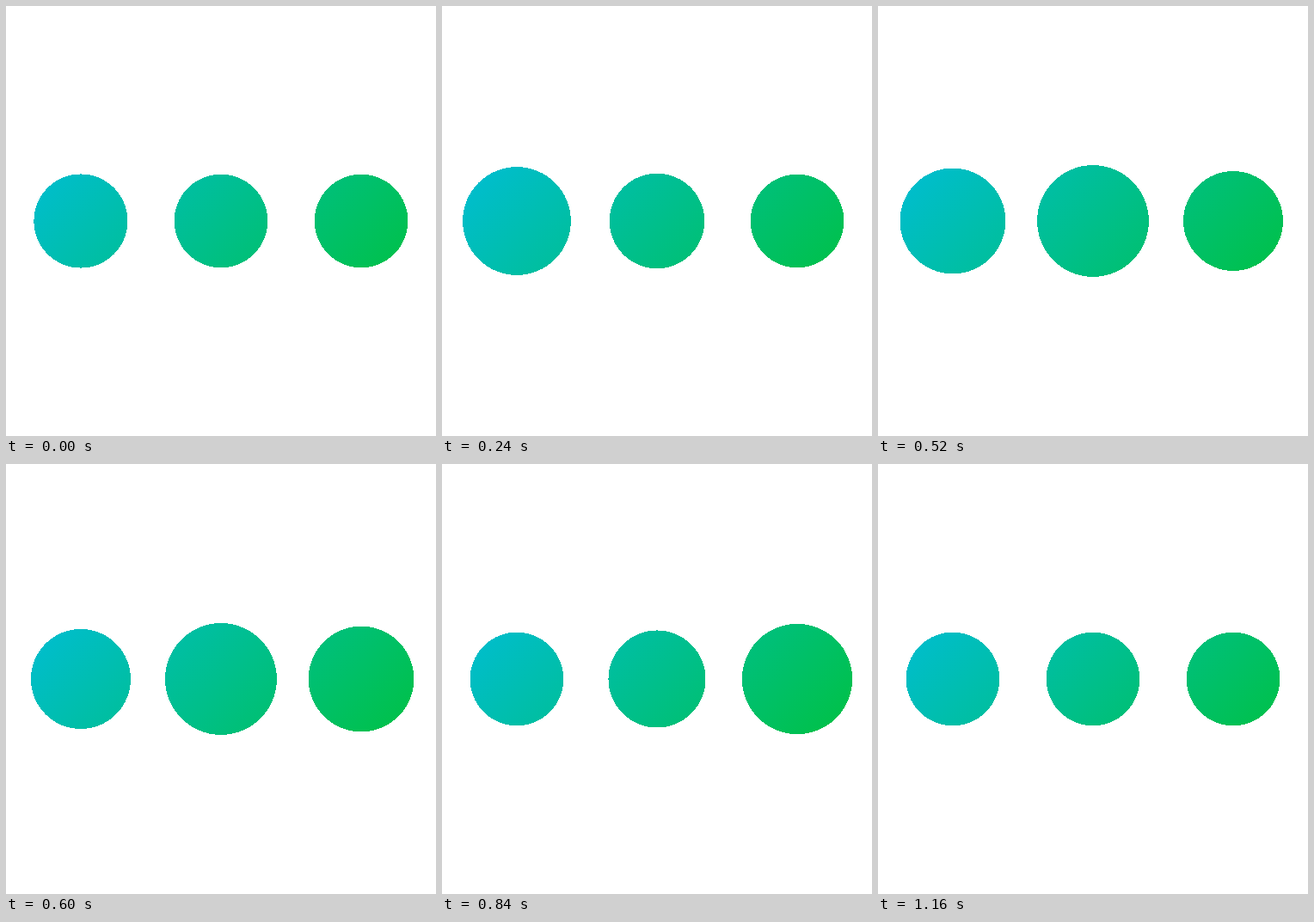
These frames come from a looping animation (500x500 px, 1.2 s). An HTML page:

```html
<!DOCTYPE html>
<html lang="en">
<head>
<meta charset="utf-8">
<title>Pulsing dots</title>
<style>
  html, body { margin: 0; width: 100%; height: 100%; overflow: hidden; background: #fff; }
  svg { display: block; width: 100%; height: 100%; }
</style>
</head>
<body>
<svg viewBox="0 0 500 500" shape-rendering="crispEdges">
  <defs>
    <linearGradient id="tint" gradientUnits="userSpaceOnUse" x1="100" y1="100" x2="400" y2="400">
      <stop offset="0" stop-color="rgb(0,189,215)"/>
      <stop offset="1" stop-color="rgb(0,193,65)"/>
    </linearGradient>
  </defs>
  <g id="dots" fill="url(#tint)"></g>
</svg>
<script>
  const LOOP = 1200, STEP = 40;
  const DELAY = 200, PEAK = 361, HALF = 396;
  const UNIT = 500 / 46;
  const group = document.getElementById('dots');

  const dots = [8, 23, 38].map(x => {
    const dot = document.createElementNS('http://www.w3.org/2000/svg', 'circle');
    dot.setAttribute('cx', x * UNIT);
    dot.setAttribute('cy', 250);
    group.appendChild(dot);
    return dot;
  });

  // Smooth rise and fall around the peak, at rest otherwise
  function pulse(t) {
    const d = Math.abs(t - PEAK) / HALF;
    return d < 1 ? (1 + Math.cos(Math.PI * d)) / 2 : 0;
  }

  function draw(time) {
    const t = Math.floor((time % LOOP) / STEP) * STEP;
    dots.forEach((dot, i) => dot.setAttribute('r', UNIT * (5 + pulse(t - i * DELAY))));
  }

  const start = performance.now();
  function tick() {
    draw(performance.now() - start);
    requestAnimationFrame(tick);
  }
  tick();
</script>
</body>
</html>
```
